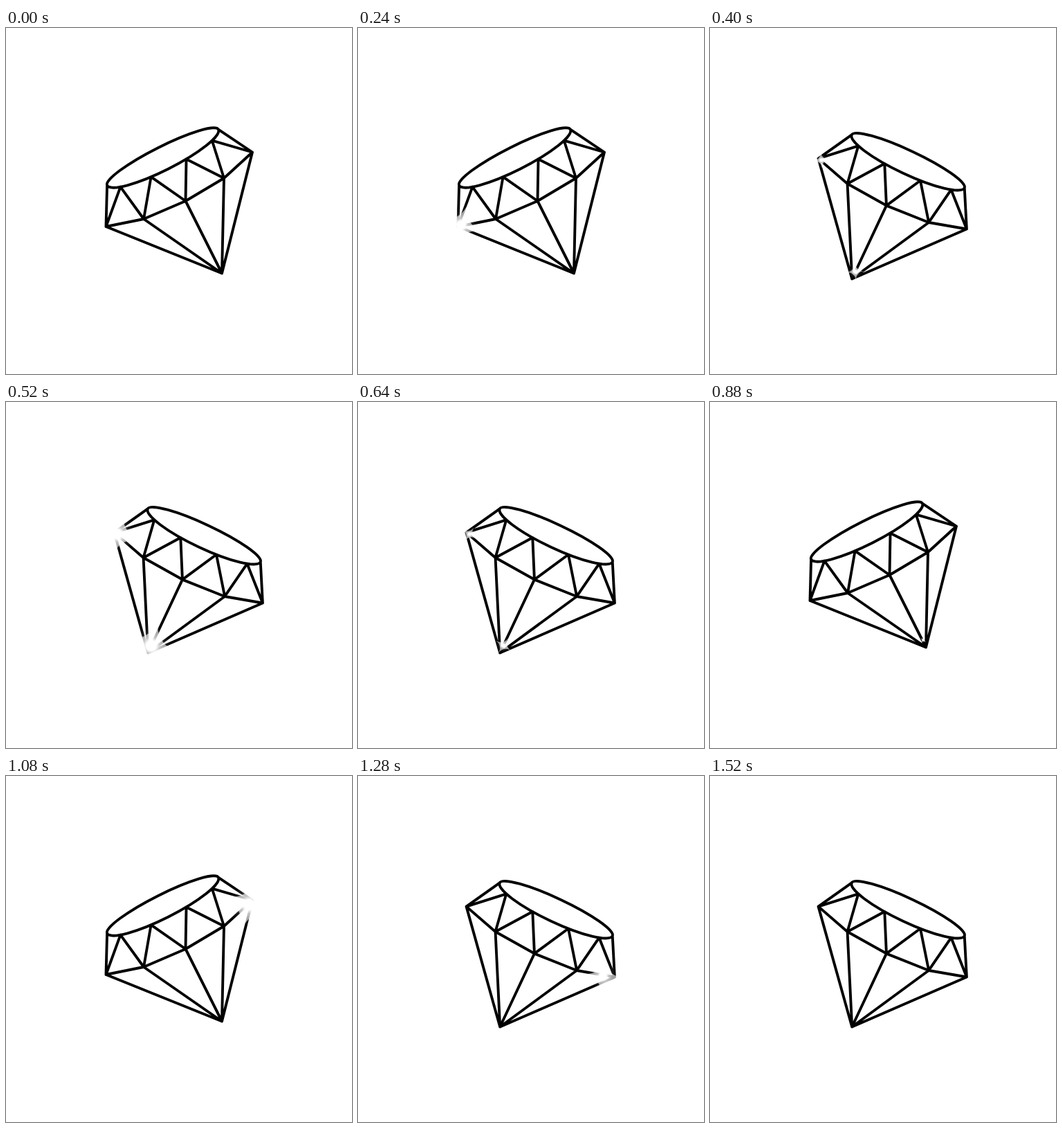
Animation of 500 by 500 pixels, one loop 1560 ms. Source, as an HTML page:

```html
<!DOCTYPE html>
<html lang="en">
<head>
<meta charset="utf-8">
<title>Sparkling diamond</title>
<style>
  html, body { margin: 0; width: 100%; height: 100%; overflow: hidden; background: #fff; }
  svg { display: block; width: 100vw; height: 100vh; }
  #gem { fill: none; stroke: #000; stroke-width: 3.9; stroke-linejoin: round; stroke-linecap: round; }
</style>
</head>
<body>
<svg id="stage" viewBox="0 0 500 500">
  <defs>
    <radialGradient id="glow">
      <stop offset=".24" stop-color="#fff"/>
      <stop offset=".4" stop-color="#fff" stop-opacity=".45"/>
      <stop offset=".65" stop-color="#fff" stop-opacity=".12"/>
      <stop offset="1" stop-color="#fff" stop-opacity="0"/>
    </radialGradient>
    <g id="star">
      <circle r="32" fill="url(#glow)"/>
      <path fill="#fff" fill-opacity=".6" d="M0-44Q1.5-4 44 0Q4 1.5 0 44Q-1.5 4-44 0Q-4-1.5 0-44Z"/>
    </g>
    <path id="gem"/>
  </defs>
</svg>
<script>
const LOOP = 1560, STEP = 40, LIFE = 190;
const stage = document.getElementById('stage');

const rim = { x: 226.5, y: 187, rx: 90, top: 15.5, bottom: 18.5, tilt: -26.7 };
const girdle = [[144.5, 287], [199, 276], [259.5, 250], [315, 217], [356, 179.5]];
const tip = [312, 354.5];

// The second pose is the first one flipped and turned by about 1.5 degrees.
const poses = [
  {
    flip: 'matrix(1 0 0 1 0 0)',
    shown: t => t < 360 || (t >= 680 && t < 1120),
    sparks: [
      { x: 149, y: 285, peak: 220, size: .8 },
      { x: 149, y: 285, peak: 590, size: .8 },
      { x: 308, y: 344, peak: 730, size: 1 },
      { x: 351, y: 186, peak: 1060, size: 1 }
    ]
  },
  {
    flip: 'matrix(-1 .0265 .0265 1 507.8 -.3)',
    shown: t => (t >= 360 && t < 680) || t >= 1120,
    sparks: [
      { x: 161, y: 191, peak: 520, size: .85 },
      { x: 210, y: 352, peak: 520, size: .95 },
      { x: 354, y: 289, peak: 1340, size: .85 }
    ]
  }
];

function add(parent, tag, attrs = {}) {
  const el = document.createElementNS('http://www.w3.org/2000/svg', tag);
  for (const key in attrs) el.setAttribute(key, attrs[key]);
  return parent.appendChild(el);
}

const rad = deg => deg * Math.PI / 180;
const line = points => 'M' + points.join('L');

function rimPoint(deg) {
  const a = rim.rx * Math.cos(rad(deg)), b = rim.bottom * Math.sin(rad(deg));
  const c = Math.cos(rad(rim.tilt)), s = Math.sin(rad(rim.tilt));
  return [rim.x + a * c - b * s, rim.y + a * s + b * c];
}

function gemPath() {
  const left = rimPoint(180), right = rimPoint(0);
  const arc = (ry, end) => `A${rim.rx} ${ry} ${rim.tilt} 0 1 ${end}`;
  const zigzag = girdle.flatMap((p, i) => i < 4 ? [p, rimPoint(145 - 37 * i)] : [p]);
  return [
    `M${left}${arc(rim.top, right)}${arc(rim.bottom, left)}Z`,
    line(zigzag),
    line(girdle),
    ...girdle.slice(1, 4).map(p => line([p, tip])),
    line([left, girdle[0], tip, girdle[4], right])
  ].join('');
}

const ease = u => u * u * (3 - 2 * u);

function drawSpark(star, { x, y, peak, size }, t) {
  const age = (t - peak) / LIFE;
  const scale = size * ease(Math.max(0, 1 - Math.abs(age)));
  star.setAttribute('transform', `translate(${x} ${y}) rotate(${15 + 30 * age}) scale(${scale})`);
}

document.getElementById('gem').setAttribute('d', gemPath());
for (const pose of poses) {
  pose.group = add(stage, 'g');
  add(pose.group, 'use', { href: '#gem', transform: pose.flip });
  pose.stars = pose.sparks.map(() => add(pose.group, 'use', { href: '#star' }));
}

function draw(now) {
  const t = Math.floor(now % LOOP / STEP) * STEP;
  for (const { group, shown, sparks, stars } of poses) {
    group.setAttribute('visibility', shown(t) ? 'visible' : 'hidden');
    sparks.forEach((spark, i) => drawSpark(stars[i], spark, t));
  }
}

const begin = performance.now();
function tick() {
  draw(performance.now() - begin);
  requestAnimationFrame(tick);
}
tick();
</script>
</body>
</html>
```
